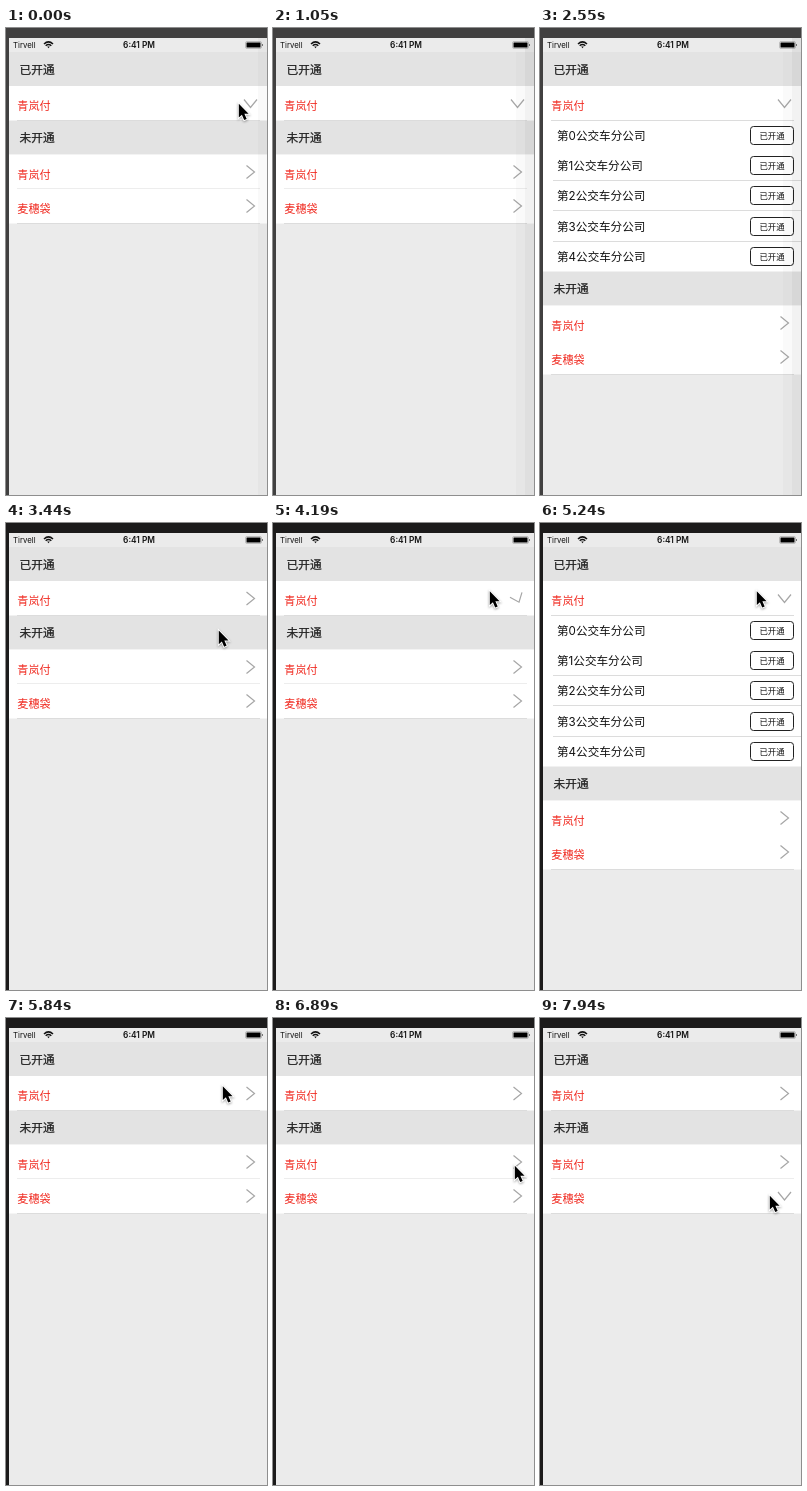
An HTML page for the animation above (8 s loop, 261 by 467 pixels).

```html
<!DOCTYPE html>
<html lang="zh">
<head>
<meta charset="utf-8">
<style>
html, body { margin: 0; width: 100%; height: 100%; overflow: hidden; background: #1c1b1b; }
svg { display: block; width: 100%; height: 100%; }
text { font-family: Inter, "Noto Sans CJK SC", "Noto Sans CJK", sans-serif; }
.head { font-size: 11.7px; fill: #222; stroke: #222; stroke-width: .25; }
.pay { font-size: 11.1px; fill: #f0281e; }
.item { font-size: 11.6px; fill: #111; }
.tag { font-size: 8.4px; fill: #111; text-anchor: middle; }
.status { font-size: 7.8px; fill: #111; }
.clock { font-size: 8.3px; font-weight: 600; fill: #111; text-anchor: middle; }
.line { fill: #dcdcdc; }
.chevron { fill: none; stroke: #a6a6a6; stroke-width: 1.2; }
</style>
</head>
<body>
<svg viewBox="0 0 261 467" preserveAspectRatio="none">
  <rect id="frame" width="261" height="467"/>
  <rect x="3" y="10" width="258" height="457" fill="#ebebeb"/>
  <text class="status" x="7" y="19.8">Tirvell</text>
  <g fill="none" stroke="#111" stroke-width="1.5">
    <path d="M38 16q4.5-4.2 9 0M39.7 17.8q2.8-2.5 5.6 0"/>
    <path d="M41.2 18.6h2.6l-1.3 1.6z" fill="#111" stroke="none"/>
  </g>
  <text class="clock" x="133" y="19.8">6:41 PM</text>
  <rect x="239.5" y="13.5" width="16" height="7" rx="1.5" fill="none" stroke="#aaa" stroke-width=".7"/>
  <rect x="240.5" y="14.5" width="14" height="5" rx=".5"/>
  <rect x="256" y="16" width="1" height="2" fill="#777"/>
  <g id="top"></g>
  <g id="items"></g>
  <g id="rest"></g>
  <rect id="inner" x="243" y="24" width="9" height="443" opacity=".02"/>
  <rect id="edge" x="252" y="10" width="9" height="457"/>
  <path id="cursor" d="M.8 .8V14.6l3.1-2.9 2.3 5.3 2.5-1.1-2.3-5.1h4.2z"
    stroke="#fff" stroke-width="1.9" paint-order="stroke"
    style="filter:drop-shadow(0 1px 1px rgba(0,0,0,.35))"/>
</svg>
<script>
const LOOP = 8000, STEP = 150, RESTART = 2690;
const $ = id => document.getElementById(id);
const rect = (x, y, w, h, attrs) => `<rect x="${x}" y="${y}" width="${w}" height="${h}" ${attrs}/>`;
const text = (kind, x, y, s) => `<text class="${kind}" x="${x}" y="${y}">${s}</text>`;
const line = (y, x = 11, end = 254) => rect(x, y, end - x, 1, 'class="line"');

const header = (y, name) => rect(3, y, 258, 34, 'fill="#e3e3e3"') + text('head', 13.6, y + 21.6, name);
const row = (y, name, id) => rect(3, y, 258, 35, 'fill="#fff"') +
  text('pay', 11.3, y + 24.3, name) +
  `<g transform="translate(244.5 ${y + 17.5})"><path id="${id}" class="chevron" d="M-4-6.5 4 0-4 6.5"/></g>`;

$('top').innerHTML = header(24, '已开通') + row(58, '青岚付', 'first');
$('rest').innerHTML = header(92.5, '未开通') + row(126.5, '青岚付', 'second') +
  '<g id="divider">' + line(160) + '</g>' + row(160.5, '麦穗袋', 'third') + line(195);
$('rest').insertAdjacentHTML('afterend', '<g>' + line(92) + '</g>');

let list = rect(3, 93, 258, 151, 'fill="#fff"');
for (let i = 0; i < 5; i++) {
  const y = 107.7 + i * 30.3;
  list += text('item', 17, y + 3.9, `第${i}公交车分公司`) +
    rect(210.5, Math.round(y - 10) + .5, 43, 18, 'rx="3" fill="none" stroke="#222"') +
    text('tag', 232, y + 3, '已开通');
  if (i > 1) list += line(Math.floor(y - 15.8), 13, 261);
}
$('items').innerHTML = list;

const openings = [
  { turn: -2 * STEP, show: 2550, end: RESTART },
  { turn: 4190, show: 4340, end: 4640 },
  { turn: 5090, show: 5240, end: 5840 }];
const angle = age => age < 0 ? 0 : Math.min(90, 67.5 * (Math.floor(age / STEP) + 1));

// time, x, y
const path = [[2840, 246, 440], [3590, 208, 68], [3740, 208, 68], [3890, 216, 67.5], [5990, 216, 67.5],
  [6740, 241, 147], [7040, 241, 147], [7340, 235, 196], [7490, 229, 177]];

function pointer(t) {
  if (t < RESTART) return t < 1050 ? [232, 75] : [-50, 0];
  const tick = RESTART + Math.floor((t - RESTART) / STEP) * STEP;
  const next = path.findIndex(p => p[0] > tick);
  if (next === 0) return [-50, 0];
  if (next < 0) return path.at(-1).slice(1);
  const [t0, x0, y0] = path[next - 1], [t1, x1, y1] = path[next];
  const k = (tick - t0) / (t1 - t0), e = k * k * (3 - 2 * k);
  return [x0 + (x1 - x0) * e, y0 + (y1 - y0) * e];
}

const rotate = (id, deg) => $(id).setAttribute('transform', `rotate(${deg})`);

function draw() {
  const t = performance.now() % LOOP;
  const opening = openings.find(o => t >= o.turn && t < o.end);
  const open = opening && t >= opening.show;
  const early = t < RESTART;
  $('frame').setAttribute('fill', early ? '#414040' : '#1c1b1b');
  rotate('first', opening ? angle(t - opening.turn) : 0);
  rotate('third', angle(t - 7790));
  $('items').style.display = open ? '' : 'none';
  $('divider').style.display = open ? 'none' : '';
  $('rest').setAttribute('transform', `translate(0 ${open ? 151 : 0})`);
  $('cursor').setAttribute('transform', `translate(${pointer(t)})`);
  $('inner').style.display = early && t >= 450 ? '' : 'none';
  $('edge').setAttribute('opacity', early ? (t < 450 ? .025 : .05) : 0);
  requestAnimationFrame(draw);
}
draw();
</script>
</body>
</html>
```
